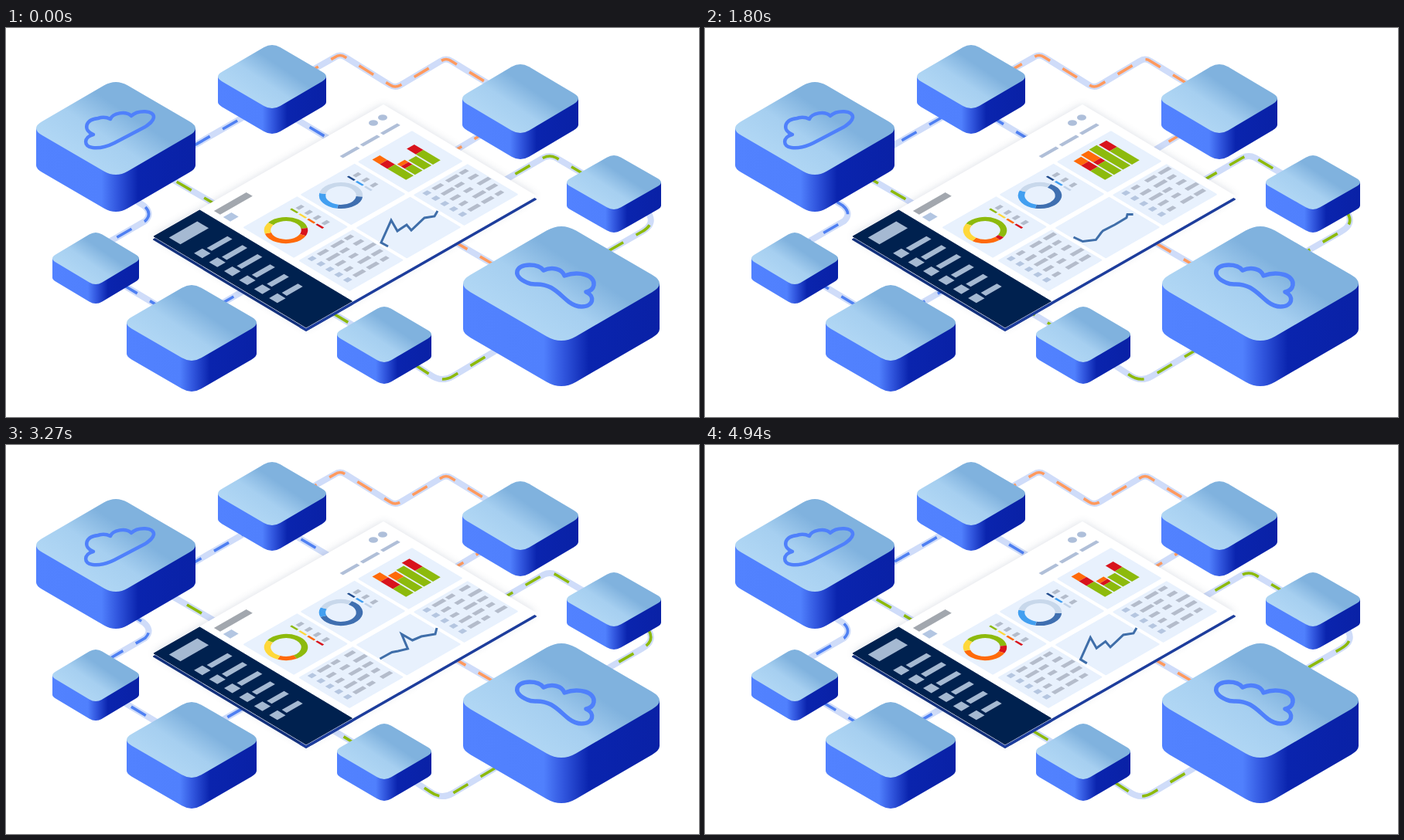
Write an HTML page that moves like this. It is 896x504 px and loops after 4980 ms.

```html
<!DOCTYPE html>
<html lang="en">
<head>
<meta charset="utf-8">
<title>Connected dashboard</title>
<style>
  html, body { margin: 0; width: 100%; height: 100%; overflow: hidden; background: #fff; }
  svg { display: block; width: 896px; height: 504px; }
</style>
</head>
<body>
<svg id="stage" viewBox="0 0 896 504" xmlns="http://www.w3.org/2000/svg"></svg>
<script>
const LOOP = 4980;
const PERIOD = 41, DASH = 22;
const BLUE = '#4f80f2', GREEN = '#8dba0c', ORANGE = '#ff9a5e', RED = '#d8131c', HOT = '#ff6a0a';

// [colour, dash periods per loop, first dash centre, path]
const links = [
  [BLUE, 2, 35, 'M320 108L240 154'],
  [BLUE, 2, 21, 'M420 145L370 115'],
  [BLUE, 2, 70, 'M165 222L178 230Q190 240 180 250L130 279'],
  [BLUE, 2, 12, 'M150 332L205 365'],
  [BLUE, 2, 17, 'M270 362L310 339'],
  [GREEN, 4, 46, 'M270 228L215 196'],
  [GREEN, 4, 11, 'M750 191L711 168Q703 164 695 168L645 197'],
  [GREEN, 4, 32, 'M828 236Q842 253 822 264L770 294'],
  [GREEN, 4, 20, 'M450 386L420 368'],
  [GREEN, 4, 35, 'M640 414L578 451Q563 460 548 449L525 434'],
  [ORANGE, 6, 40, 'M395 55L425 38Q432 33 439 38L497 74Q503 78 510 74L562 43Q569 38 576 43L625 73'],
  [ORANGE, 6, 0, 'M615 138L575 162'],
  [ORANGE, 6, 49, 'M580 277L640 312']
];

// [centre x, centre y, half width, half height, depth]
const blocks = [
  [142, 130, 103, 60, 48], [344, 63, 70, 41, 33], [665, 91.5, 75, 44.5, 34],
  [786, 200, 61, 35, 30], [116, 298.5, 56, 33.5, 25], [240, 382, 84, 49, 40],
  [489, 397, 61, 36, 28], [718, 331, 127, 74, 59]
];

const clouds = [
  'M112 155C100 154 100 141 113 138C100 133 101 119 119 117C125 115 131 116 135 118C138 110 155 107 162 114C170 106 192 106 191 116C190 121 186 124 180 128L140 149C130 154 120 156 112 155Z',
  'M674 330C654 322 658 307 677 307C686 307 692 310 695 314C706 309 719 312 722 321C740 314 762 320 760 333C759 339 755 341 750 342C762 347 760 361 744 361C738 361 732 358 728 355C714 344 706 331 684 332Q678 332 674 330Z'
];

// Key times and the values of each chart at those times
const times = [0, 570, 1370, 2240, 2800, 3740, LOOP];
const ringA = [
  [215, 350, 385, 525], [210, 358, 385, 515], [210, 378, 405, 490],
  [210, 405, 410, 480], [210, 420, 420, 470], [212, 420, 420, 475]
];
const ringB = [
  [5, 100, 190], [-55, 100, 215], [-60, 95, 215],
  [-60, 110, 190], [-60, 140, 190], [-60, 180, 215]
];
// starts of orange, red and green in each column
const columns = [
  [.27, .32, .37, .375, .40, .425, .39, .39, .39, .32, .32, .38],
  [.31, .38, .38, .27, .33, .42, .26, .26, .26, .255, .255, .31],
  [.30, .34, .37, .27, .35, .41, .27, .27, .27, .27, .27, .33],
  [.27, .33, .42, .28, .36, .36, .27, .27, .27, .28, .28, .36],
  [.27, .32, .42, .30, .36, .36, .28, .28, .28, .285, .285, .38],
  [.27, .33, .39, .33, .38, .38, .34, .34, .34, .29, .29, .37]
];
const trend = [
  [494, 283, 485, 278, 498, 249, 506, 263, 518, 255, 524, 262, 541, 246, 554, 244, 558, 237],
  [468, 265, 487, 273, 492, 281, 504, 270, 523, 262, 527, 256, 522, 241, 545, 243, 562, 242],
  [472, 266, 481, 274, 500, 268, 515, 263, 521, 268, 535, 254, 549, 238, 556, 250, 560, 252],
  [481, 276, 496, 279, 511, 281, 509, 268, 508, 257, 524, 256, 541, 254, 536, 233, 547, 231],
  [478, 275, 496, 266, 508, 273, 526, 260, 511, 247, 524, 248, 537, 250, 555, 245, 556, 237],
  [489, 279, 502, 271, 506, 261, 513, 268, 512, 243, 527, 258, 537, 246, 555, 245, 558, 237]
];

const svg = document.getElementById('stage');

function add(tag, attrs, parent = svg) {
  const el = document.createElementNS('http://www.w3.org/2000/svg', tag);
  for (const name in attrs) el.setAttribute(name, attrs[name]);
  parent.append(el);
  return el;
}

// Panel coordinates: u runs up-right, v runs down-right, both 0 to 1
const at = (u, v) => [191 + 297 * u + 197 * v, 270 - 170 * u + 118 * v].map(n => n.toFixed(1)).join();
const quad = (u0, u1, v0, v1) => [at(u0, v0), at(u1, v0), at(u1, v1), at(u0, v1)].join(' ');
const tile = (u0, u1, v0, v1, fill, extra) => add('polygon', { points: quad(u0, u1, v0, v1), fill, ...extra });

function gradient(id, line, stops) {
  const g = add('linearGradient', { id, ...line }, defs);
  stops.forEach(([offset, color]) => add('stop', { offset, 'stop-color': color }, g));
}

const defs = add('defs');
gradient('top', { x1: .22, y1: .85, x2: .85, y2: .3 },
  [[0, '#b2d8f5'], [.4, '#a6cff0'], [.72, '#80b2de'], [1, '#80b2de']]);
const blur = add('filter', { id: 'soft', x: '-10%', y: '-10%', width: '120%', height: '120%' }, defs);
add('feGaussianBlur', { stdDeviation: 6 }, blur);

function drawLinks() {
  links.forEach(l => add('path', { d: l[3], fill: 'none', stroke: '#cfdcf9', 'stroke-width': 8 }));
  return links.map(([stroke, laps, start, d]) => {
    const el = add('path', { d, fill: 'none', stroke, 'stroke-width': 3.6, 'stroke-dasharray': `${DASH} ${PERIOD - DASH}` });
    return { el, laps, start };
  });
}

function roundDiamond(cx, cy, w, h) {
  const cut = .14, k = 1 - cut / 2;
  const c = [[0, -h / k], [w / k, 0], [0, h / k], [-w / k, 0]];
  const toward = (a, b) => `${cx + a[0] + (b[0] - a[0]) * cut} ${cy + a[1] + (b[1] - a[1]) * cut}`;
  return c.map((p, i) => {
    const prev = c[(i + 3) % 4], next = c[(i + 1) % 4];
    return `${i ? 'L' : 'M'}${toward(p, prev)}Q${cx + p[0]} ${cy + p[1]} ${toward(p, next)}`;
  }).join('') + 'Z';
}

function drawBlock([cx, cy, w, h, depth], i) {
  gradient('side' + i, { gradientUnits: 'userSpaceOnUse', x1: cx - w, y1: 0, x2: cx + w, y2: 0 },
    [[0, '#5282ff'], [.41, '#5080fd'], [.51, '#3156de'], [.64, '#0a24ae'], [1, '#0921a6']]);
  const fill = `url(#side${i})`;
  add('path', { d: roundDiamond(cx, cy + depth, w, h), fill });
  add('rect', { x: cx - w, y: cy, width: 2 * w, height: depth, fill });
  add('path', { d: roundDiamond(cx, cy, w, h), fill: 'url(#top)' });
}

function drawPanel() {
  const outline = quad(0, 1, 0, 1);
  add('polygon', { points: outline, fill: '#2a3a66', opacity: .2, filter: 'url(#soft)' });
  const edge = (a, b, fill) => add('polygon', {
    points: [...a, ...b].join(' '), transform: 'translate(0 4)', fill, stroke: fill, 'stroke-width': 2, 'stroke-linejoin': 'round'
  });
  edge([at(0, 0), at(0, 1)], [at(.2, 1), at(.2, 0)], '#12307c');
  edge([at(0, 1), at(1, 1)], [at(1, .96), at(0, .96)], '#1d3d9c');
  add('polygon', { points: outline, fill: '#fff', stroke: '#fff', 'stroke-width': 2, 'stroke-linejoin': 'round' });
  tile(0, .2, 0, 1, '#00214f', { stroke: '#00214f', 'stroke-linejoin': 'round' });

  const pale = '#a5b9d2';
  tile(.03, .153, .055, .13, pale);
  [.09, .09, .09, .08, .075, .07].forEach((len, i) => {
    const v = .251 + i * .0985;
    tile(.027, .063, v - .027, v + .027, pale);
    tile(.075, .075 + len, v - .016, v + .016, pale);
  });

  tile(.229, .37, .05, .091, '#a2a7ae');
  tile(.226, .262, .115, .162, '#b3c6e2');
  [[475, 123], [487, 116]].forEach(([cx, cy]) => add('ellipse', { cx, cy, rx: 6, ry: 3.8, fill: '#aebfda' }));
  [.75, .838, .926].forEach(u => tile(u - .037, u + .037, .146, .167, '#b0bfd8'));

  for (const u of [.235, .485, .735])
    for (const v of [.24, .605])
      tile(u, u + .23, v, v + .325, '#e8f1fd', { stroke: '#e8f1fd', 'stroke-width': 2, 'stroke-linejoin': 'round' });

  legend(.408, [GREEN, '#ffd83a', HOT, RED]);
  legend(.656, ['#1f4a8c', '#3f9df0', '#c3d3e8']);
}

function legend(u, colors) {
  colors.forEach((c, i) => {
    const v = .285 + i * .056;
    tile(u - .004, u + .004, v, v + .044, c);
    tile(u + .014, u + .038, v + .01, v + .032, '#b3bccb');
  });
}

function ring(cx, cy, colors) {
  const g = add('g', { transform: `translate(${cx} ${cy}) scale(1 .605)`, fill: 'none', 'stroke-width': 8.5 });
  return colors.map(stroke => add('circle', { r: 24, pathLength: 360, stroke }, g));
}

function setRing(arcs, starts) {
  arcs.forEach((el, i) => {
    const end = i + 1 < starts.length ? starts[i + 1] : starts[0] + 360;
    const span = Math.max(0, end - starts[i]);
    el.setAttribute('transform', `rotate(${starts[i]})`);
    el.setAttribute('stroke-dasharray', `${span} 720`);
    el.setAttribute('visibility', span < .5 ? 'hidden' : 'visible');
  });
}

function table(u) {
  const cells = [];
  for (let row = 0; row < 5; row++) {
    const v = .632 + row * .0585;
    tile(u - .011, u + .011, v - .014, v + .014, '#b5c6e0');
    for (let col = 0; col < 3; col++)
      cells.push({ el: tile(0, 0, 0, 0, '#b4bccb'), u: u + .028 + col * .059, v, phase: row * 1.7 + col * 2.1 });
  }
  return cells;
}

// Value row of a chart at a given time
function mix(rows, t) {
  let i = 0;
  while (t >= times[i + 1]) i++;
  const k = (t - times[i]) / (times[i + 1] - times[i]);
  const next = rows[(i + 1) % rows.length];
  return rows[i].map((a, j) => a + (next[j] - a) * k);
}

const dashes = drawLinks();
drawPanel();
const arcsA = ring(362, 262, [GREEN, RED, HOT, '#ffd83a']);
const arcsB = ring(433, 217, ['#3f6fb0', '#429ff0', '#c8d8eb']);
const bars = Array.from({ length: 12 }, (_, i) => tile(0, 0, 0, 0, [HOT, RED, GREEN][i % 3]));
const cells = [...table(.27), ...table(.77)];
const line = add('polyline', { fill: 'none', stroke: '#3f6ea9', 'stroke-width': 3, 'stroke-linejoin': 'miter' });
blocks.forEach(drawBlock);
clouds.forEach((d, i) => add('path', { d, fill: 'none', stroke: '#4f80fb', 'stroke-width': i ? 5.5 : 4.5, 'stroke-linejoin': 'round' }));

function render(t) {
  const turn = t / LOOP;
  dashes.forEach(({ el, laps, start }) =>
    el.setAttribute('stroke-dashoffset', DASH / 2 - start - laps * PERIOD * turn));

  setRing(arcsA, mix(ringA, t));
  setRing(arcsB, mix(ringB, t));

  const starts = mix(columns, t);
  bars.forEach((el, i) => {
    const u = .772 + Math.floor(i / 3) * .039;
    const end = i % 3 < 2 ? starts[i + 1] : .492;
    el.setAttribute('points', quad(u, u + .033, starts[i], end));
  });

  cells.forEach(({ el, u, v, phase }) => {
    const len = .039 + .011 * Math.sin(turn * Math.PI * 4 + phase);
    el.setAttribute('points', quad(u, u + len, v - .012, v + .012));
  });

  line.setAttribute('points', mix(trend, t).map(n => n.toFixed(1)).join(' '));
}

const began = performance.now();
function tick() {
  render((performance.now() - began) % LOOP);
  requestAnimationFrame(tick);
}
tick();
</script>
</body>
</html>
```
